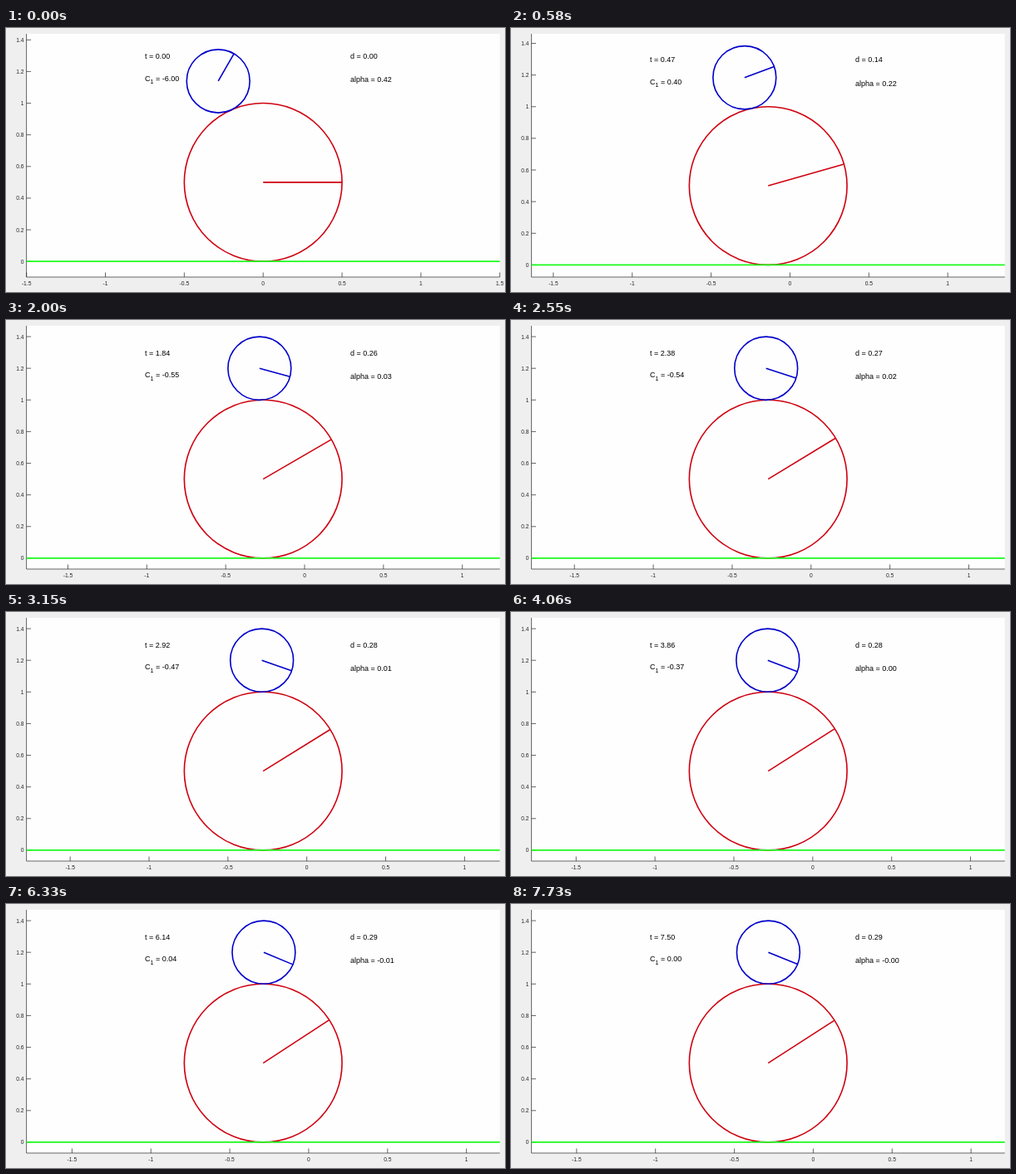
An HTML page that plays this animation: 600 px wide and 318 px high, repeating every 7790 ms.

```html
<!DOCTYPE html>
<html lang="en">
<head>
<meta charset="utf-8">
<title>Ball balancing on a ball</title>
<style>
  html, body { margin: 0; width: 100%; height: 100%; overflow: hidden; background: #f0eff0; }
  svg { display: block; width: 600px; height: 318px; }
  text { font-family: "Liberation Sans", Arial, sans-serif; }
  .tick { font-size: 6.7px; fill: #262626; }
  .note { font-size: 9px; fill: #000; white-space: pre; }
  .axis { stroke: #262626; stroke-width: .7; fill: none; }
  .big, .small { fill: none; stroke-width: 1.6; }
  .big { stroke: #cf000f; }
  .small { stroke: #0000cb; }
  .ground { stroke: #1dfb1d; stroke-width: 1.8; }
</style>
</head>
<body>
<svg id="stage" viewBox="0 0 600 318"></svg>
<script>
const LOOP = 7790, SLOT = 32.8, LAST_SLOT = 236;
const LEFT = 24.6, RIGHT = 593.8, TOP = 7, BOTTOM = 300;
const MID_X = 309.2, MID_Y = 153.5, SX = 189.7, SY = 190.6;
const R = 0.5, r = 0.2, ALPHA0 = Math.PI / 7.5;

const HELD_SLOTS = [25, 85, 146, 206];
// [step, simulated time]
const CLOCK = [[18, .47], [60, 1.84], [94, 2.92], [150, 4.81], [190, 6.14], [232, 7.5]];
// [time, value, slope]
const DISTANCE = [[0, 0, 0], [.47, .1384, .24], [1.84, .2625, .025], [2.92, .2768, .0075],
  [4.81, .2865, .003], [6.14, .2885, 0], [7.5, .2858, 0]];
const CONTROL = [[0, -6, 22], [.47, .4, 1.5], [1.84, -.55, -.1], [2.92, -.47, .1],
  [4.81, -.24, .17], [6.14, .04, .1], [7.5, 0, 0]];

const stage = document.getElementById("stage");

function set(node, attrs) {
  for (const name in attrs) node.setAttribute(name, attrs[name]);
  return node;
}

function add(tag, attrs, text = "") {
  const node = set(document.createElementNS("http://www.w3.org/2000/svg", tag), attrs);
  node.textContent = text;
  return stage.appendChild(node);
}

function segment(keys, x) {
  let i = 0;
  while (i < keys.length - 2 && x >= keys[i + 1][0]) i++;
  return [keys[i], keys[i + 1]];
}

function hermite(keys, x) {
  const [[x0, y0, m0], [x1, y1, m1]] = segment(keys, x);
  const h = x1 - x0, u = (x - x0) / h, v = 1 - u;
  return v * v * ((1 + 2 * u) * y0 + u * h * m0) + u * u * ((1 + 2 * v) * y1 - v * h * m1);
}

// The solver takes tiny steps at the start, then nearly even ones.
function simTime(step) {
  if (step < 18) return .0326 * step - .118 * (1 - Math.exp(-step / 4));
  const [[s0, t0], [s1, t1]] = segment(CLOCK, step);
  return t0 + (t1 - t0) * (step - s0) / (s1 - s0);
}

function makeTick(value, anchor) {
  return {
    value,
    mark: add("path", { class: "axis" }),
    label: add("text", { class: "tick", "text-anchor": anchor }, String(value))
  };
}

function makeBall(cls) {
  return { rim: add("ellipse", { class: cls }), spoke: add("line", { class: cls }) };
}

function placeBall(ball, cx, cy, radius, angle) {
  const rx = radius * SX, ry = radius * SY;
  set(ball.rim, { cx, cy, rx, ry });
  set(ball.spoke, {
    x1: cx, y1: cy,
    x2: cx + rx * Math.cos(angle), y2: cy - ry * Math.sin(angle)
  });
}

add("rect", { x: LEFT, y: TOP, width: RIGHT - LEFT, height: BOTTOM - TOP, fill: "#fefefe" });
add("path", { class: "axis", d: `M${LEFT} ${TOP}V${BOTTOM}H${RIGHT}` });
const xTicks = [-2, -1.5, -1, -.5, 0, .5, 1, 1.5].map(v => makeTick(v, "middle"));
const yTicks = [0, .2, .4, .6, .8, 1, 1.2, 1.4].map(v => makeTick(v, "end"));
const bigBall = makeBall("big");
const smallBall = makeBall("small");
const ground = add("line", { class: "ground", x1: LEFT, x2: RIGHT });

const [timeNote, letterNote, indexNote, controlNote, distanceNote, alphaNote] =
  [167, 167, 173.5, 177.4, 414, 414].map(x => add("text", { class: "note", x }));
letterNote.textContent = "C";
indexNote.textContent = "1";
indexNote.style.fontSize = "7px";

function write(node, y, text) {
  node.setAttribute("y", y);
  if (text !== undefined) node.textContent = text;
}

function draw(ms) {
  const slot = Math.min(LAST_SLOT, Math.floor((ms + 12) / SLOT));
  const step = slot - HELD_SLOTS.filter(s => slot >= s).length;
  const t = simTime(step);
  const d = hermite(DISTANCE, t);
  const alpha = ALPHA0 - d / .68;

  // The view follows the big ball and centres the stack vertically.
  const height = R + r + (R + r) * Math.cos(alpha);
  const floor = MID_Y + height / 2 * SY;
  const toX = x => MID_X + (x + d) * SX;
  const toY = y => floor - y * SY;

  for (const { value, mark, label } of xTicks) {
    const x = toX(value);
    const display = x < LEFT - 1 || x > RIGHT + 1 ? "none" : "inline";
    set(mark, { d: `M${x} ${BOTTOM}v-5.5`, display });
    set(label, { x, y: 309.6, display });
  }
  for (const { value, mark, label } of yTicks) {
    const y = toY(value);
    set(mark, { d: `M${LEFT} ${y}h5.5` });
    set(label, { x: 21.6, y: y + 2.5 });
  }

  const spin = d / R;
  placeBall(bigBall, toX(-d), toY(R), R, spin);
  placeBall(smallBall, toX(-d - (R + r) * Math.sin(alpha)), toY(R + (R + r) * Math.cos(alpha)),
    r, R / r * (ALPHA0 - spin));
  set(ground, { y1: floor, y2: floor });

  write(timeNote, floor - 244, "t = " + t.toFixed(2));
  write(letterNote, floor - 217.5);
  write(indexNote, floor - 214);
  write(controlNote, floor - 217.5, " = " + hermite(CONTROL, t).toFixed(2));
  write(distanceNote, floor - 244, "d = " + d.toFixed(2));
  write(alphaNote, floor - 215.8, "alpha = " + alpha.toFixed(2));
}

const start = performance.now();
function tick() {
  draw((performance.now() - start) % LOOP);
  requestAnimationFrame(tick);
}
tick();
</script>
</body>
</html>
```
